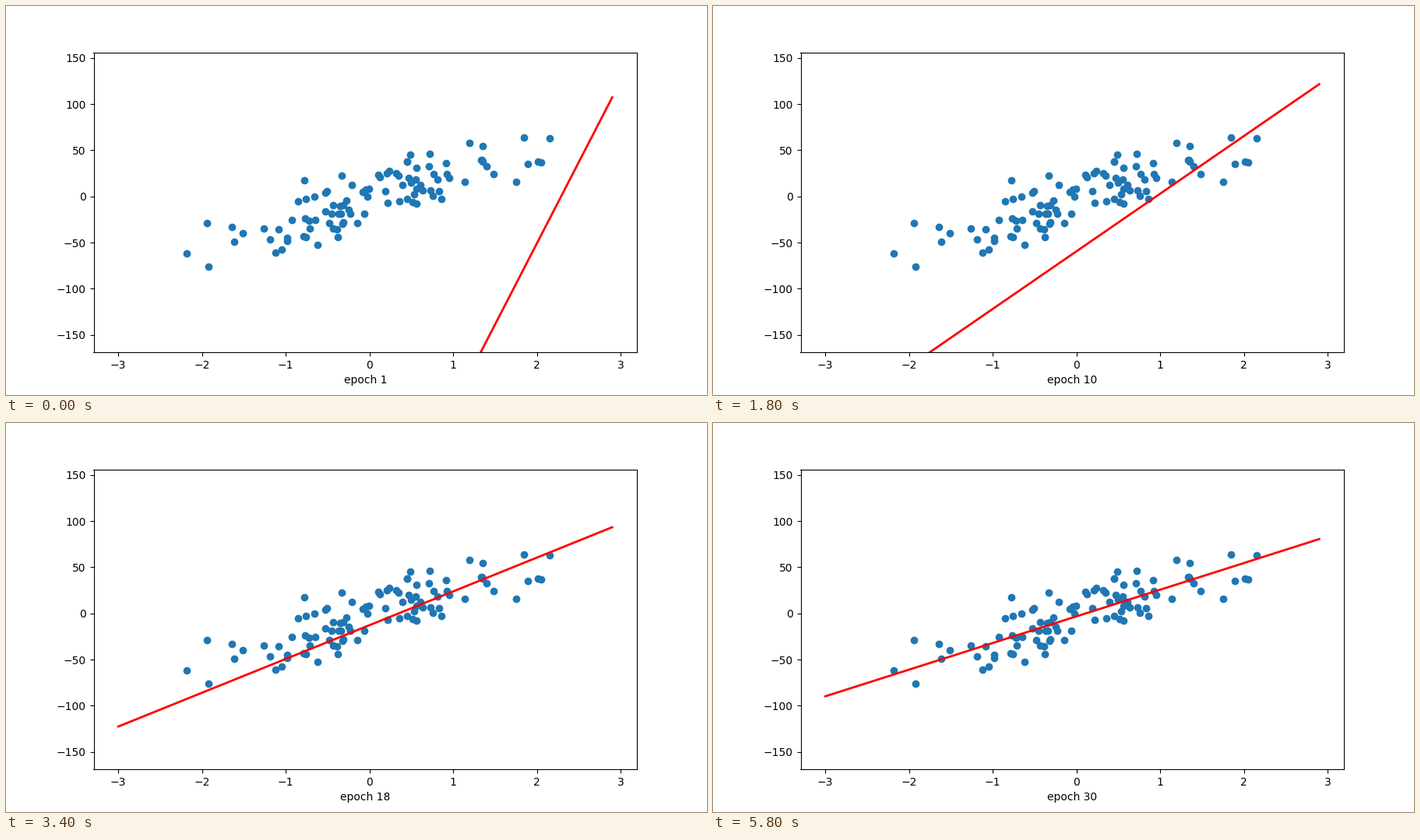
Write a matplotlib script that moves like this. It is 900x500 px and loops after 6000 ms.

```python
import numpy as np
import matplotlib.pyplot as plt
from matplotlib.animation import FuncAnimation

EPOCHS = 30
RATE = 0.001


def make_data(n=100, noise=20, seed=13):
    """Noisy linear data with one random slope."""
    rng = np.random.RandomState(seed)
    x = rng.standard_normal(n)
    slope = 100 * rng.uniform()
    return x, slope * x + rng.normal(scale=noise, size=n)


def descend(x, y, m=200.0, b=-500.0):
    """Slope and intercept after each epoch of batch gradient descent."""
    path = []
    for _ in range(EPOCHS):
        err = y - m * x - b
        m += RATE * 2 * np.sum(err * x)
        b += RATE * 2 * np.sum(err)
        path.append((m, b))
    return path


x, y = make_data()
path = descend(x, y)
grid = np.arange(-3, 3, 0.1)

fig, ax = plt.subplots(figsize=(9, 5), dpi=100)
ax.scatter(x, y)
# The first guess sets the axis limits.
line, = ax.plot(grid, grid * 50 - 4, "r-", linewidth=2)
ax.set_xlim(ax.get_xlim())
ax.set_ylim(ax.get_ylim())


def update(i):
    m, b = path[i]
    line.set_ydata(m * grid + b)
    ax.set_xlabel(f"epoch {i + 1}")
    return line,


anim = FuncAnimation(fig, update, frames=EPOCHS, interval=200, repeat=True)
plt.show()
```
